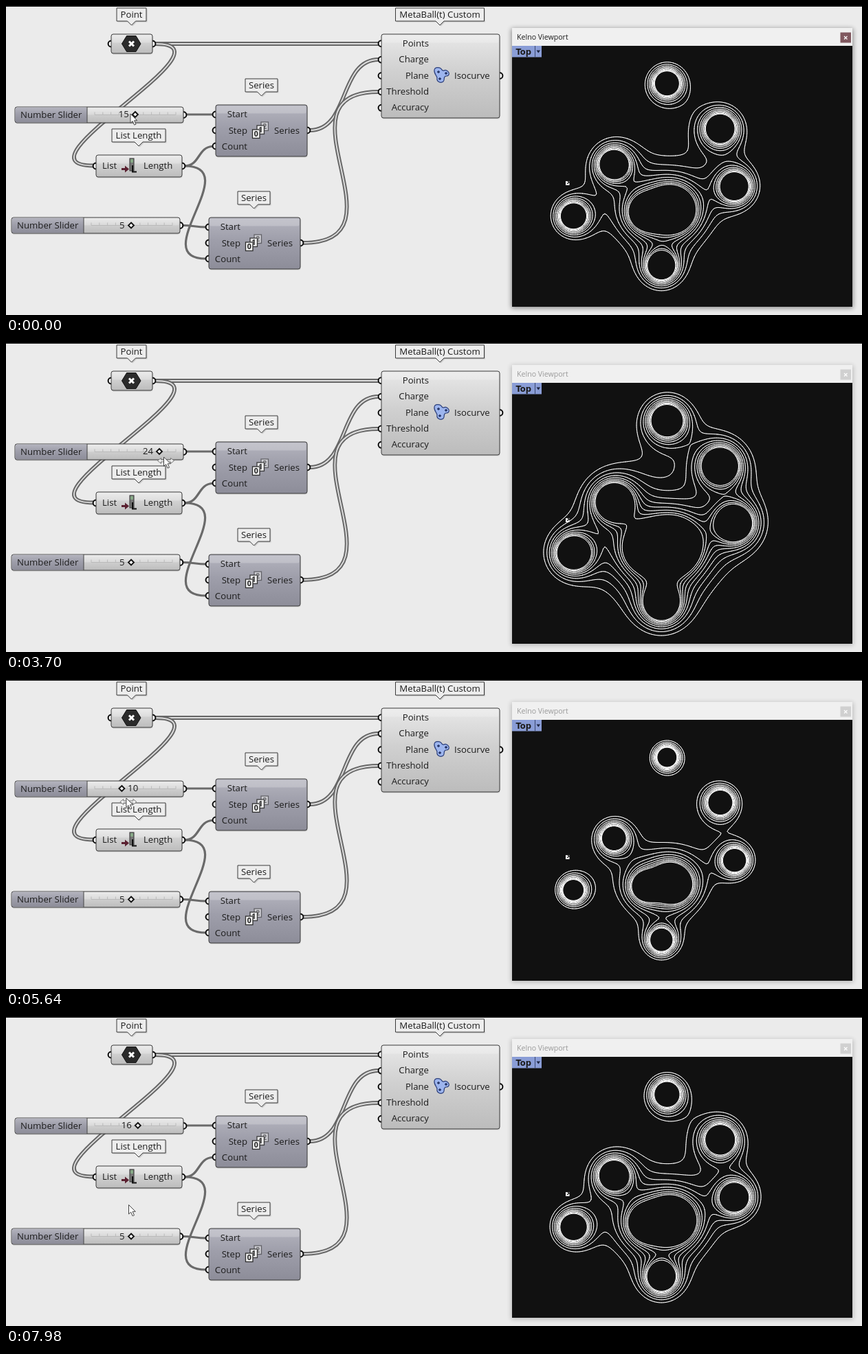
Write an HTML page that moves like this. It is 1245x450 px and loops after 8 s.

```html
<!DOCTYPE html>
<html lang="en">
<head>
<meta charset="utf-8">
<title>Metaball isocurves</title>
<style>
html, body { margin: 0; width: 100%; height: 100%; overflow: hidden; background: #ebebeb; }
svg { display: block; width: 100vw; height: 100vh; }
text { font: 13.2px "Open Sans", "Noto Sans", sans-serif; fill: #1c1c1c; white-space: pre; }
.end { text-anchor: end; }
.mid { text-anchor: middle; }
.wire { fill: none; stroke: #666; }
.edge { stroke: #3c3c3c; stroke-width: 1; }
</style>
</head>
<body>
<svg id="stage" viewBox="0 0 1245 450" preserveAspectRatio="none"></svg>
<script>
const LOOP = 8000;
const UNIT = 249; // squared pixels per unit of charge
const stage = document.getElementById('stage');

const text = (x, y, s, cls = '') => `<text x="${x}" y="${y + 4.6}" class="${cls}">${s}</text>`;
const rect = (x, y, w, h, attrs) => `<rect x="${x}" y="${y}" width="${w}" height="${h}" ${attrs}/>`;
const body = (x, y, w, h, fill) =>
  rect(x + .5, y + 1.5, w, h, 'rx="3" fill="#000" opacity=".16"') +
  rect(x, y, w, h, `rx="3" fill="url(#${fill})" class="edge"`) +
  rect(x + 1.5, y + 1.5, w - 3, Math.min(11, h * .42), 'rx="2" fill="#fff" opacity=".22"');
const grip = (x, y) => `<circle cx="${x}" cy="${y}" r="4.4" fill="#fff" stroke="#111" stroke-width="2.1"/>`;

function wire(x1, y1, x2, y2, k, double) {
  const d = `M${x1} ${y1}C${x1 + k} ${y1} ${x2 - k} ${y2} ${x2} ${y2}`;
  const line = (w, c) => `<path d="${d}" class="wire" style="stroke:${c};stroke-width:${w}"/>`;
  return double ? line(5.8, '#666') + line(1.9, '#dedede') : line(3.2, '#6a6a6a');
}

function label(cx, y, w, s) {
  const l = cx - w / 2, r = cx + w / 2, b = y + 19;
  const d = `M${l} ${y}H${r}V${b}H${cx + 6}L${cx} ${b + 6}L${cx - 6} ${b}H${l}Z`;
  return `<path d="${d}" transform="translate(1.5 1.5)" opacity=".15"/>` +
    `<path d="${d}" fill="#ededed" stroke="#3a3a3a"/>` + text(cx, y + 9.6, s, 'mid');
}

function seriesNode(x, y) {
  const card = (dx, dy, n, o) => rect(x + dx, y + dy, 10.5, 12.5,
    `fill="#f2f2f2" stroke="#2e2e2e" stroke-width="1.3" opacity="${o}"`) +
    `<text x="${x + dx + 5.2}" y="${y + dy + 10}" class="mid" opacity="${o}" style="font-size:10.5px;font-weight:700">${n}</text>`;
  return grip(x, y + 14) + grip(x, y + 37) + grip(x, y + 60) + grip(x + 133, y + 37) +
    body(x, y, 133, 75, 'dark') +
    text(x + 46, y + 13.5, 'Start', 'end') + text(x + 46, y + 37, 'Step', 'end') +
    text(x + 46, y + 60, 'Count', 'end') + text(x + 85, y + 37, 'Series') +
    card(66, 25, 2, .55) + card(60, 30, 1, .9) + card(53.5, 36, 0, 1);
}

function slider(x, y) {
  let ticks = '';
  for (let i = 0; i <= 10; i++) ticks += `M${x + 116 + i * 11.8} ${y + 7.5}v4`;
  return grip(x + 245, y + 11.5) + body(x, y, 245, 23, 'light') +
    rect(x + .5, y + .5, 104.5, 22, 'rx="2.5" fill="url(#dark)"') +
    `<path d="M${x + 105} ${y}v23" stroke="#444"/>` +
    `<path d="${ticks}M${x + 116} ${y + 11.5}h118" stroke="#bababa" fill="none"/>` +
    text(x + 8, y + 11, 'Number Slider');
}

const diamond = '<path d="M0-4L4 0L0 4L-4 0Z" fill="#fff" stroke="#111" stroke-width="1.9"/>';
const gradient = (id, a, b, c) => `<linearGradient id="${id}" x2="0" y2="1">
  <stop stop-color="${a}"/><stop offset=".45" stop-color="${b}"/><stop offset="1" stop-color="${c}"/></linearGradient>`;

const pointNode = grip(153, 55) + grip(213, 55) + body(153, 41, 60, 28, 'light') +
  '<path d="M168.5 55L175.5 43.5H189L196 55L189 66.5H175.5Z" fill="#2b2b2b" stroke="#111"/>' +
  '<path d="M179 51.5l7 7m0-7l-7 7" stroke="#fff" stroke-width="3"/>';

const lengthNode = grip(131, 233) + grip(256, 233) + body(131, 217, 125, 32, 'light') +
  text(140, 232, 'List') + text(200, 232, 'Length') +
  rect(180, 222, 6, 18, 'fill="#777" stroke="#333"') + rect(181, 223, 4, 5, 'fill="#86a886"') +
  '<path d="M168 236h5v-3.500l6 5-6 5v-3.500h-5Z" fill="#5a2030"/>' +
  '<path d="M184 232v9.500h6" fill="none" stroke="#111" stroke-width="2"/>';

const ballInputs = ['Points', 'Charge', 'Plane', 'Threshold', 'Accuracy'];
const ballNode = ballInputs.map((_, i) => grip(546, 54.7 + i * 23.4)).join('') + grip(718, 101.5) +
  body(546, 41, 172, 122, 'light') +
  ballInputs.map((s, i) => text(615, 54.2 + i * 23.4, s, 'end')).join('') + text(652, 101, 'Isocurve') +
  `<path d="M623 93C624 88 632 89 634 93C637 96 637 92 641 94C646 97 645 102 640 102C635 103 639 107 636 110
    C632 113 626 110 627 105C627 101 622 99 623 93Z" fill="#9db5ee" stroke="#2c3f7a" stroke-width="1.2"/>
  <path d="M627 96h4m-2-2v4M638 98h4m-2-2v4M629 106h4m-2-2v4" stroke="#1d2c5c" stroke-width="1.3"/>`;

stage.innerHTML = `
<defs>
  ${gradient('light', '#e8e8e8', '#d0d0d0', '#bcbcbc')}
  ${gradient('dark', '#b4b4be', '#9e9eaa', '#8d8d99')}
  <filter id="blur" x="-10%" y="-10%" width="120%" height="120%"><feGaussianBlur stdDeviation="3.5"/></filter>
  <clipPath id="view">${rect(736, 58, 495, 380, '')}</clipPath>
</defs>
${rect(0, 0, 1245, 450, 'fill="#ebebeb"')}${rect(0, 0, 1245, 1, 'fill="#111"')}
${wire(217, 55, 542, 55, 50, true)}
${wire(217, 55, 127, 232.5, 125, true)}
${wire(262, 158, 301, 158, 15)}
${wire(260, 233, 301, 204.500, 22)}
${wire(260, 233, 291, 368, 88)}
${wire(257, 319.500, 291, 322, 15)}
${wire(442, 181, 542, 78, 58, true)}
${wire(432, 345, 542, 125, 158, true)}
${pointNode}${lengthNode}${ballNode}
${seriesNode(305, 144)}${seriesNode(295, 308)}
${slider(13, 147)}${slider(8, 308)}
${text(172.5, 319, '5', 'end')}<g transform="translate(182 319.500)">${diamond}</g>
${label(182.5, 3, 43, 'Point')}${label(631, 3, 129, 'MetaBall(t) Custom')}
${label(371.5, 106, 47, 'Series')}${label(193, 179, 78, 'List Length')}${label(360.5, 270, 47, 'Series')}
<g id="shadow">${rect(735, 33, 497, 407, 'fill="#000" filter="url(#blur)"')}</g>
${rect(736, 32, 495, 406, 'fill="#111"')}${rect(736, 32, 495, 26, 'fill="#f0f0f0"')}
<text id="title" x="743" y="48.500" style="font-size:10.6px">Kelno Viewport</text>
<rect id="close" x="1213.500" y="38.500" width="15.500" height="15"/>
<path d="M1219 44l4.500 4.500m0-4.500l-4.500 4.500" stroke="#fff" stroke-width="1.200"/>
<path id="curves" clip-path="url(#view)" fill="none" stroke="#fff" stroke-width="1" stroke-linecap="round"/>
${rect(736, 58, 43, 16.5, 'fill="#8a9dd6"')}
<text x="741.500" y="70.500" style="font:bold 11.500px 'DejaVu Sans','Open Sans',sans-serif">Top</text>
<path d="M769.500 58v16.500" stroke="#3c4870"/><path d="M771.500 64.500h5.500l-2.750 4Z" fill="#1c2440"/>
<path d="M814 255h3v2.500h2.500v3.500h-5.500Z" fill="#fff"/><path d="M816 258.500h2" stroke="#111"/>
<path d="M818 255.500h1.500" stroke="#aaa"/>
<text id="value" y="162"></text><g id="knob">${diamond}</g>
<g id="cursor">
  <path id="arrows" d="M-9 5.500l5-4v2.500h14v-2.500l5 4l-5 4v-2.500h-14v2.500Z" fill="#eee" stroke="#777"/>
  <path d="M0 0V13.500L3.200 10.600L5.600 16.200L8 15.200L5.600 9.800H9.800Z" fill="#fff" stroke="#444"/>
</g>`;

const el = {};
for (const id of ['shadow', 'title', 'close', 'curves', 'value', 'knob', 'cursor', 'arrows'])
  el[id] = document.getElementById(id);

// Each point carries a charge of start + its index.
const points = [[961.3, 112.5], [825, 306], [953.3, 379], [1060, 262.7], [884, 230.2],
  [1039, 178.3], [931, 300.5], [966, 291.5], [973, 299.5]];
const levels = points.map((_, i) => 1 / Math.sqrt(5 + i));

// Inverse root of the summed field, close to linear around every ball.
function field(x, y, start) {
  let sum = 0;
  points.forEach(([px, py], i) => {
    sum += UNIT * (start + i) / ((x - px) ** 2 + (y - py) ** 2 + 1e-6);
  });
  return 1 / Math.sqrt(sum);
}

function isocurves(start) {
  const step = 2.5, x0 = 736, y0 = 58, cols = 198, rows = 152;
  const grid = [];
  for (let j = 0; j <= rows; j++) {
    grid.push([]);
    for (let i = 0; i <= cols; i++) grid[j].push(field(x0 + i * step, y0 + j * step, start));
  }
  const out = [];
  for (let j = 0; j < rows; j++) for (let i = 0; i < cols; i++) {
    const v = [grid[j][i], grid[j][i + 1], grid[j + 1][i + 1], grid[j + 1][i]];
    const lo = Math.min(...v), hi = Math.max(...v);
    for (const level of levels) {
      if (level <= lo || level > hi) continue;
      const hits = [];
      for (let e = 0; e < 4; e++) {
        const a = v[e], b = v[(e + 1) % 4];
        if ((a < level) === (b < level)) continue;
        const f = (level - a) / (b - a);
        const [dx, dy] = [[f, 0], [1, f], [1 - f, 1], [0, 1 - f]][e];
        hits.push((x0 + (i + dx) * step).toFixed(2) + ' ' + (y0 + (j + dy) * step).toFixed(2));
      }
      const mean = (v[0] + v[1] + v[2] + v[3]) / 4;
      if (hits.length === 4 && (mean < level) !== (v[0] < level)) hits.push(hits.shift());
      for (let k = 0; k + 1 < hits.length; k += 2) out.push('M' + hits[k] + 'L' + hits[k + 1]);
    }
  }
  return out.join('');
}

// Slider ramps: first time, first value, last value, interval.
const ramps = [[1260, 16, 16, 1], [2120, 17, 17, 1], [2470, 18, 18, 1], [2680, 19, 19, 1],
  [2820, 20, 22, 135], [3420, 23, 24, 210], [3840, 25, 26, 210], [4450, 25, 15, 70],
  [5290, 14, 10, 70], [6120, 9, 7, 140], [6860, 8, 16, 80]];

function sliderValue(t) {
  let value = 15;
  for (const [t0, from, to, gap] of ramps) {
    if (t < t0) break;
    const n = Math.min(Math.abs(to - from), Math.floor((t - t0) / gap));
    value = from + Math.sign(to - from) * n;
  }
  return value;
}

const dragY = [[540, 163], [1330, 163], [1390, 166], [4450, 166], [4870, 170.5], [5640, 172],
  [6050, 172], [6400, 174], [6860, 174], [7560, 168]];

function track(keys, t) {
  let i = 1;
  while (i < keys.length - 1 && t > keys[i][0]) i++;
  const [t0, a] = keys[i - 1], [t1, b] = keys[i];
  return a + (b - a) * Math.min(1, Math.max(0, (t - t0) / (t1 - t0)));
}

function pointer(t, knob) {
  if (t < 70) return [181, 157];
  if (t < 140) return [182, 156.5];
  if (t < 400) return [183.5, 156.5];
  if (t < 540) return [194, 162];
  if (t >= 7980) return [178.5, 273.5];
  if (t >= 7910) return [183, 250];
  if (t >= 7840) return [191, 205];
  if (t >= 7770) return [198, 171];
  return [knob + 6.5, Math.round(track(dragY, t) * 2) / 2];
}

const cache = {};
let shown = null;

function draw(t) {
  const value = sliderValue(t), knob = 129.4 + value * 3.9;
  if (value !== shown) {
    shown = value;
    el.curves.setAttribute('d', cache[value] || (cache[value] = isocurves(value)));
    const left = value > 10;
    el.value.textContent = value;
    el.value.setAttribute('class', left ? 'end' : '');
    el.value.setAttribute('x', knob + (left ? -9 : 8.7));
    el.knob.setAttribute('transform', `translate(${knob} 158)`);
  }
  const active = t < 870;
  el.shadow.setAttribute('opacity', active ? .42 : .22);
  el.title.style.fill = active ? '#1c1c1c' : '#9a9a9a';
  el.close.setAttribute('fill', active ? '#80585f' : '#d0d0d0');
  el.cursor.setAttribute('transform', `translate(${pointer(t, knob)})`);
  el.arrows.setAttribute('visibility', t >= 400 && t < 7840 ? 'visible' : 'hidden');
}

const began = performance.now();
function tick() {
  draw((performance.now() - began) % LOOP);
  requestAnimationFrame(tick);
}
tick();
</script>
</body>
</html>
```
